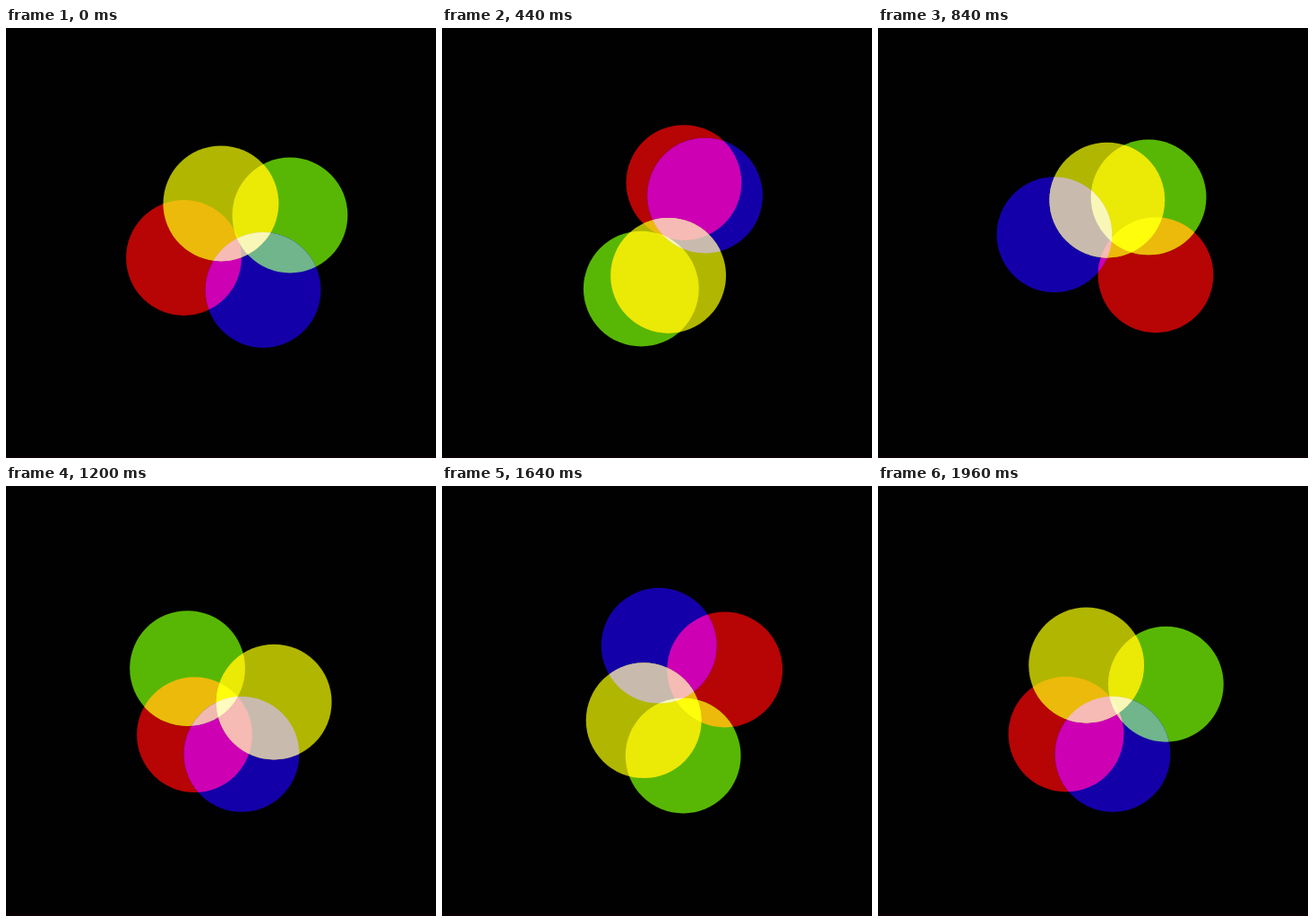
Animation of 480 by 480 pixels, one loop 2000 ms. Source, as an HTML page with a canvas:

```html
<!DOCTYPE html>
<html lang="en">
<head>
<meta charset="utf-8">
<title>Orbiting colour discs</title>
<style>
  html, body { margin: 0; width: 100%; height: 100%; overflow: hidden; background: #010101; }
  canvas { display: block; }
</style>
</head>
<body>
<canvas id="stage" width="480" height="480"></canvas>
<script>
const ctx = document.getElementById('stage').getContext('2d');
const LOOP = 2000, STEP = 40, TICKS = 48, RADIUS = 64.4;

// Centre and radius of each orbit, start angle in degrees, signed rate.
const discs = [
  { x: 259.4, y: 236,   orbit: 64.3, start: 161.4, rate: 1,       speedsUp: true },   // red
  { x: 258.3, y: 237,   orbit: 65,   start: -25.5, rate: -1,      speedsUp: false },  // green
  { x: 258.3, y: 237.8, orbit: 61.8, start: 62.3,  rate: -0.9955, speedsUp: true },   // blue
  { x: 257.4, y: 234.3, orbit: 42.3, start: 245.6, rate: 1,       speedsUp: false }   // yellow
];

// Colour of each overlap, indexed by bits: red 1, green 2, blue 4, yellow 8.
const mix = [
  '#010101', '#b70404', '#58b704', '#ecba0a',
  '#1400a9', '#cd00b3', '#70b58c', '#f0bab0',
  '#b1b600', '#ecba0a', '#ebe906', '#fdfd0c',
  '#c9baae', '#f6bbb4', '#f9f7b8', '#fefac0'
];

const bits = m => [0, 1, 2, 3].filter(i => m >> i & 1);
const overlaps = mix.map((_, m) => m).slice(1)
  .sort((a, b) => bits(a).length - bits(b).length);

// Two turns: a steady slow pace that swells smoothly into a fast one.
const swell = k => 11.8 * k + 32.3 * Math.log(1 + Math.exp((k - 32.3) / 3.3));
const turned = (k, speedsUp) =>
  speedsUp ? swell(k) : swell(TICKS) - swell(TICKS - k);

function place(disc, tick) {
  const a = (disc.start + disc.rate * turned(tick, disc.speedsUp)) * Math.PI / 180;
  return [disc.x + disc.orbit * Math.cos(a), disc.y + disc.orbit * Math.sin(a)];
}

function draw(time) {
  // 24 poses a second shown at 25 pictures a second.
  const shown = Math.floor(time % LOOP / STEP);
  const tick = Math.floor(shown * TICKS * STEP / LOOP);
  const spots = discs.map(d => place(d, tick));

  ctx.fillStyle = mix[0];
  ctx.fillRect(0, 0, 480, 480);
  ctx.fillStyle = '#080003';
  ctx.fillRect(0, 477, 480, 3);

  for (const m of overlaps) {
    ctx.save();
    for (const i of bits(m)) {
      ctx.beginPath();
      ctx.arc(...spots[i], RADIUS, 0, 2 * Math.PI);
      ctx.clip();
    }
    ctx.fillStyle = mix[m];
    ctx.fillRect(0, 0, 480, 480);
    ctx.restore();
  }
}

function loop() {
  draw(performance.now());
  requestAnimationFrame(loop);
}
loop();
</script>
</body>
</html>
```
